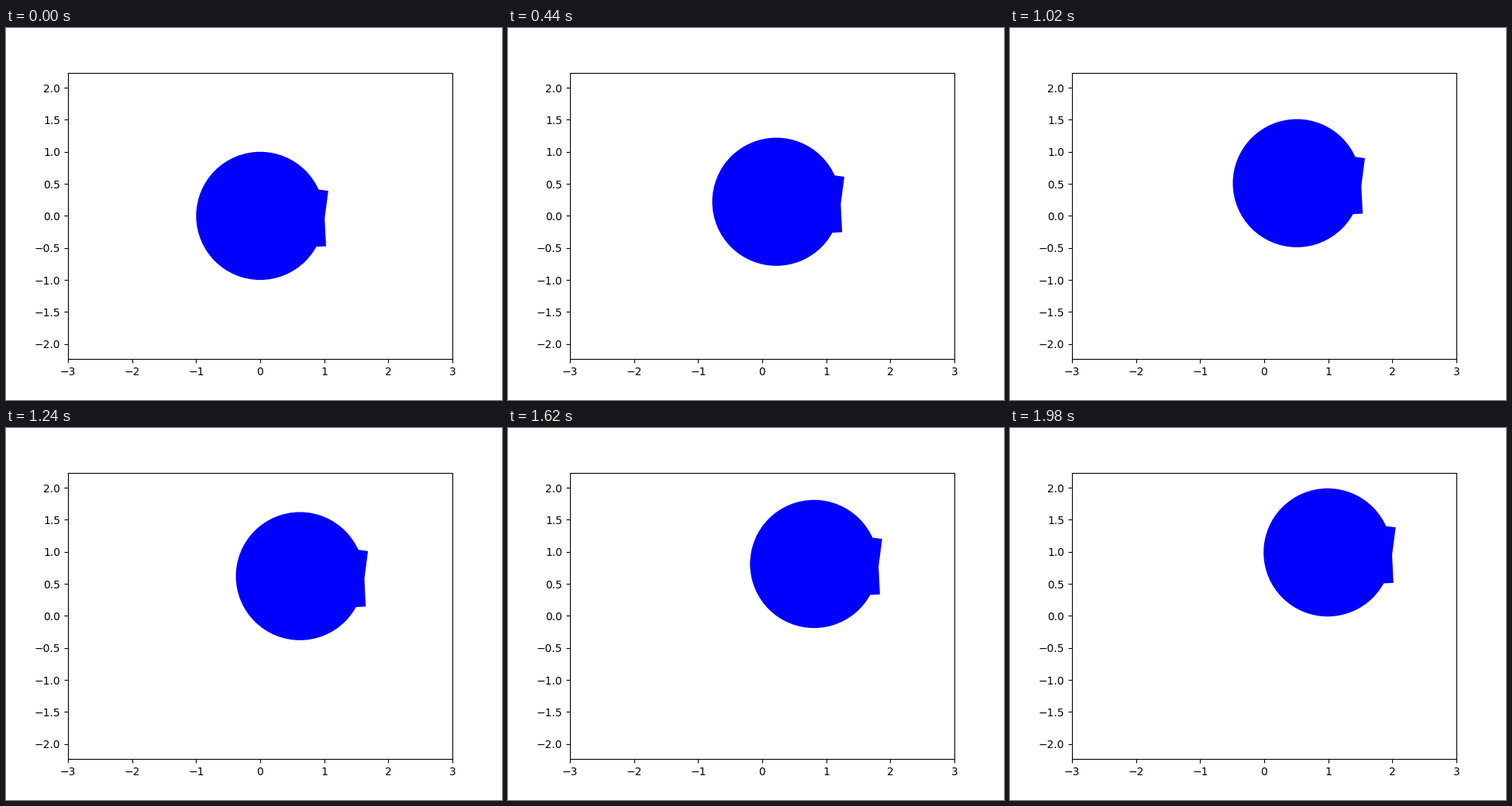
Write a matplotlib script that moves like this. It is 640x480 px and loops after 2 s.

```python
import numpy as np
import matplotlib.pyplot as plt
from matplotlib.animation import FuncAnimation
from matplotlib.patches import Circle, Polygon

FRAMES = 100
STEP = 0.01                    # data units moved per frame, in x and y
TILT = np.radians(-2.3)        # axis of the notched bracket
TIP_R, TIP_A = 1.132, np.radians(22.5)
NOTCH_R, DEPTH = 1.007, 0.2


def bracket():
    """Two plates meeting at a notch, mirrored about the tilted axis."""
    tip = TIP_R * np.array([np.cos(TIP_A), np.sin(TIP_A)])
    notch = np.array([NOTCH_R, 0])
    edge = (tip - notch) / np.linalg.norm(tip - notch)
    inner = tip + DEPTH * np.array([-edge[1], edge[0]])
    flip = np.array([1, -1])
    pts = np.array([inner, tip, notch, tip * flip, inner * flip])
    c, s = np.cos(TILT), np.sin(TILT)
    return pts @ np.array([[c, s], [-s, c]])


fig = plt.figure(figsize=(6.4, 4.8), dpi=100)
ax = fig.add_subplot()
half_h = 3 * 369.6 / 496       # equal scale on both axes
ax.set_xlim(-3, 3)
ax.set_ylim(-half_h, half_h)

shape = bracket()
disc = ax.add_patch(Circle((0, 0), 1, fc="blue", lw=0))
plates = ax.add_patch(Polygon(shape, closed=True, fc="blue", lw=0))


def update(i):
    shift = i * STEP
    disc.center = (shift, shift)
    plates.set_xy(shape + shift)
    return disc, plates


anim = FuncAnimation(fig, update, frames=FRAMES, interval=20, repeat=True)
plt.show()
```
